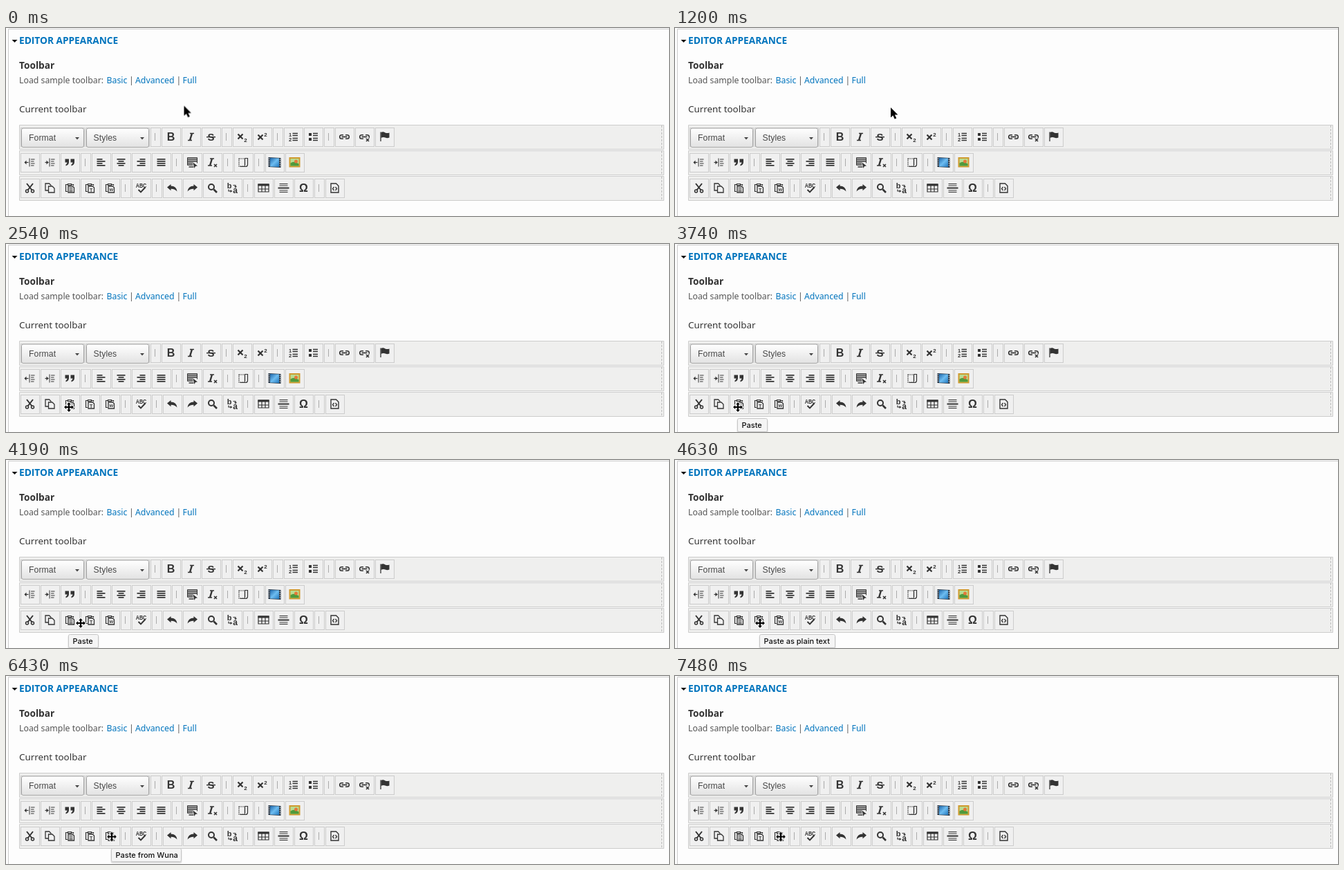
Write an HTML page that moves like this. It is 959 px wide and 272 px high and loops after 8000 ms.

```html
<!DOCTYPE html>
<html lang="en">
<head>
<meta charset="utf-8">
<title>Editor toolbar</title>
<style>
html, body { margin: 0; width: 100%; height: 100%; overflow: hidden; background: #fdfdfd; }
svg { display: block; }
.ui { font-family: "Noto Sans", sans-serif; }
.bold { font: 700 13.7px "Open Sans", sans-serif; }
.combo { font: 12.2px "Liberation Sans", Arial, sans-serif; letter-spacing: .1px; fill: #474747; }
.tip text { font: 500 11px Inter, sans-serif; fill: #111; }
.link { fill: #0074bd; }
.ui .link { font-weight: 500; }
.icon { fill: #333; font-family: "Liberation Sans", Arial, sans-serif; font-weight: 700; text-anchor: middle; }
.line { fill: none; stroke: #333; }
.tip, .cursor { opacity: 0; }
</style>
</head>
<body>
<svg id="stage" width="959" height="272" viewBox="0 0 959 272">
  <defs>
    <linearGradient id="face" x2="0" y2="1"><stop stop-color="#fff"/><stop offset="1" stop-color="#e2e2e2"/></linearGradient>
    <linearGradient id="sky" x2="1" y2="1"><stop stop-color="#1c66ab"/><stop offset=".5" stop-color="#6dbcf0"/><stop offset="1" stop-color="#2279c0"/></linearGradient>
  </defs>
  <path d="M959 1.5H3.5V272" fill="none" stroke="#ccc"/>
  <path d="M8.500 17h8l-4 4z" fill="#111"/>
  <text class="bold link" x="19" y="23">EDITOR APPEARANCE</text>
  <text class="bold" x="19" y="59" fill="#333">Toolbar</text>
  <g class="ui" font-size="12.3" fill="#555">
    <text x="19" y="80">Load sample toolbar:</text>
    <text x="145.5" y="80" class="link">Basic</text>
    <text x="178" y="80">|</text>
    <text x="187" y="80" class="link">Advanced</text>
    <text x="246.5" y="80">|</text>
    <text x="255.5" y="80" class="link">Full</text>
  </g>
  <text class="ui" font-size="13.4" x="19" y="122" fill="#333">Current toolbar</text>
  <g id="toolbar"></g>
  <g id="tips"></g>
  <path id="arrow" class="cursor" d="M0 0V14.5L3.3 11.4 5.8 16.7 8.3 15.6 5.9 10.5H10.4Z" stroke="#fff" stroke-width="1.8" paint-order="stroke" stroke-linejoin="round"/>
  <path id="move" class="cursor" d="M0-7L3-3.8H1.1V-1.1H3.8V-3L7 0 3.8 3V1.1H1.1V3.8H3L0 7-3 3.8H-1.1V1.1H-3.8V3L-7 0-3.8-3V-1.1H-1.1V-3.8H-3Z" stroke="#fff" stroke-width="2" paint-order="stroke" stroke-linejoin="round"/>
</svg>
<script>
const LOOP = 8000;
const $ = id => document.getElementById(id);

// Icon helpers; every icon is drawn around its own centre.
const solid = d => `<path d="${d}"/>`;
const line = (d, width = 1.3) => `<path class="line" stroke-width="${width}" d="${d}"/>`;
const glyph = (s, size, x, y) => `<text font-size="${size}" x="${x}" y="${y}">${s}</text>`;
const bars = (...rows) => solid(rows.map(([x, w], i) => `M${x} ${i * 3 - 5.5}h${w}v1.8h${-w}z`).join(''));
const slantedI = line('M-1.5-5H4.5M-4.5 5H1.5', 1.6) + line('M1.5-5L-1.5 5', 2.4);
const clip = mark => line('M-3.5-5H-6V5H-3.500M2.5-5H5V-3.500', 1.2) +
  line('M-3-4V-6H2V-4Z', 1.2) + line('M-2.5-2.5H4L6-.5V6.5H-2.5Z', 1.3) + mark;
const chain = line('M-1.5-2.8H-4a2.8 2.8 0 0 0 0 5.600H-1.5M1.5-2.8H4a2.8 2.8 0 0 1 0 5.600H1.5', 1.6) + line('M-4 0H4', 1.8);
const indent = side => line('M-.5-6V6', 1) + line('M1.5-4.5H7M1.5-1.500H6M1.5 1.500H7M1.5 4.500H6', 1.2) +
  line('M-7 0H-2', 1.2) + solid(side < 0 ? 'M-8 0l3-3v6z' : 'M-2 0l-3-3v6z');
const quote = x => `M${x}-5h5.500v4.500q0 4-4.500 5.500v-2q2-1 2-3h-3z`;
const turn = 'M-7.500-1L-2-5.500V-3Q6-3 7 5Q4 1-2 1.200V3.800Z';

const ICONS = {
  bold: glyph('B', 16, 0, 5.5),
  italic: slantedI,
  strike: glyph('S', 15, 0, 5.3) + line('M-6.5 .2H6.5', 1.5),
  sub: line('M-6-4L1 3M1-4L-6 3', 2.2) + glyph('2', 8, 5, 7),
  sup: line('M-6-3L1 4M1-3L-6 4', 2.2) + glyph('2', 8, 5, -1),
  numbers: glyph('1', 7.5, -4.5, -1) + glyph('2', 7.5, -4.5, 6.5) + line('M-1-5H6.5M-1-2H6.5M-1 2H6.5M-1 5H6.5', 1.4),
  bullets: solid('M-6.500-5.500h4v4h-4zM-6.500 1.500h4v4h-4z') + line('M-.5-5H6.5M-.5-2H6.5M-.5 2H6.5M-.5 5H6.5', 1.4),
  link: chain,
  unlink: chain + '<path d="M2 2L7 7M7 2L2 7" stroke="#f0f0f0" stroke-width="4"/>' + line('M2.5 2.5L6.5 6.5M6.5 2.5L2.5 6.5', 1.6),
  flag: line('M-5.5-7V6.5', 1.3) + solid('M-5-6.500Q-2-8 1-6Q4-5 7-6V1Q4 2.500 1 1Q-2 0-5 1.500Z'),
  outdent: indent(-1),
  indent: indent(1),
  quote: solid(quote(-7) + quote(1)),
  left: bars([-6, 8], [-6, 12], [-6, 8], [-6, 12]),
  center: bars([-6, 12], [-4, 8], [-6, 12], [-4, 8]),
  right: bars([-2, 8], [-6, 12], [-2, 8], [-6, 12]),
  justify: bars([-6, 12], [-6, 12], [-6, 12], [-6, 12]),
  select: line('M-7-6.500H7M-7-4H7M-7-1.500H7M-7 1H1M-7 3.500H1M-5 6.500H2', 1.4) + line('M-7-7V4M7-7V1', 1) + solid('M1 0L7.500 5 4.500 5.500 3 8.500Z'),
  clear: `<g transform="translate(-2 -.5)">${slantedI}</g>` + line('M2.5 2.5L6.5 6.5M6.5 2.5L2.5 6.5', 1.5),
  blocks: '<path class="line" stroke-dasharray="1.5 1" stroke-width="1.2" d="M-6.5-5.5H2V5.500H-6.5Z"/>' +
    line('M2-6H6V3Q6 6 3 6H-5M2 4V-6', 1.2),
  video: '<path d="M-9-7.500L9-6.500V7.500L-9 6.500Z" fill="#234"/><path d="M-6.5-6.500L6.500-6V6.500L-6.500 6Z" fill="url(#sky)"/>' +
    '<path d="M-7.800-6V6M7.800-5V7" stroke="#ddd" stroke-dasharray="1.5 1.5"/>',
  image: '<path d="M-8-7.500H8V7H-8Z" fill="#cf9a2e"/><path d="M-6-5.500H6V5H-6Z" fill="#b9dc91"/><path d="M-6 5V1Q-1-3 6 2V5Z" fill="#4f9a3c"/><circle cx="2" cy="-1.500" r="2.500" fill="#e5783b"/>',
  cut: line('M-4.5-6.500L3 3M4.5-6.500L-3 3', 2) + line('M-6 4.500a2 2 0 1 0 4 0a2 2 0 1 0-4 0M2 4.500a2 2 0 1 0 4 0a2 2 0 1 0-4 0', 1.5),
  copy: line('M-2.5 3.500H-6.5V-6.500H-1L1.5-4V-3', 1.3) + line('M-2-2.500H3.500L6.5 .5V6.500H-2Z', 1.3),
  paste: clip(line('M-1 0H4M-1 2.200H4M-1 4.400H4', 1.1)),
  plain: clip(glyph('T', 7, 1.7, 5)),
  office: clip(glyph('W', 6, 1.7, 4.8)),
  spell: `<g transform="scale(.85 1)">${glyph('ABC', 8.5, 0, -1)}</g>` + line('M-4 2.500L-.5 6L6-1', 1.9),
  undo: solid(turn),
  redo: `<g transform="scale(-1 1)">${solid(turn)}</g>`,
  find: '<circle class="line" cx="-1.500" cy="-1.500" r="4" stroke-width="2"/>' + line('M2 2L6.500 6.500', 2.6),
  replace: glyph('b', 11, -4.5, 0) + glyph('a', 12, 4, 7) + line('M-5.5 2V4.500H-2M1-4H4.500V-2', 1.2) + solid('M-3 2.500l3 2-3 2zM2.500-2.500h4l-2 2.500z'),
  table: solid('M-8-6H8V-3H-8Z') + line('M-7.500-5.500H7.500V5.500H-7.500ZM-7.500 1.500H7.500M-2.500-5V5M2.500-5V5', 1.2),
  rule: line('M-6-6H6M-6-3.500H6M-6 3.500H6M-6 6H6', 1.2) + line('M-8 0H8', 2),
  omega: glyph('Ω', 16, 0, 5.5),
  source: line('M-5.5-6.500H2L5.5-3V6.500H-5.5Z', 1.4) + line('M-1-1.500L-3 1L-1 3.500M1-1.500L3 1L1 3.500', 1.3)
};

const combos = { format: ['Format', 33], styles: ['Styles', 126.5] };
const rows = [
  'format styles | bold italic strike | sub sup | numbers bullets | link unlink flag',
  'outdent indent quote | left center right justify | select clear | blocks | video image',
  'cut copy paste plain office | spell | undo redo find replace | table rule omega | source'
];

const drawCombo = ([label, textX], x) => `<rect x="${x + 1.5}" y="145" width="90" height="27.5" rx="2.5" fill="url(#face)" stroke="#a6a6a6"/>
  <text class="combo" x="${textX}" y="163">${label}</text>
  <path d="M${x + 79} 158h6l-3 3.500z" fill="#474747"/>`;

function drawRow(tools, row) {
  const y = 140 + row * 37;
  const mid = y + 17.5;
  let x = 21;
  let out = `<path d="M19.5 ${y + .5}h932v35h-932z" fill="#efefee" stroke="#ccc"/>
    <path d="M948.5 ${y + 1}v34" stroke="#bbb" stroke-dasharray="3 2"/>`;
  for (const tool of tools.split(' ')) {
    const width = tool === '|' ? 15 : combos[tool] ? 93 : 28;
    out += `<rect x="${x + .5}" y="${y + 4.5}" width="${width - 1}" height="27" fill="#f0f0f0" stroke="#ccc"/>`;
    if (tool === '|') out += `<path d="M${x + 6.5} ${mid - 5.5}v11" stroke="#aaa"/>`;
    else if (combos[tool]) out += drawCombo(combos[tool], x);
    else out += `<g class="icon" transform="translate(${x + 13.5} ${mid})">${ICONS[tool]}</g>`;
    x += width + 1;
  }
  return out;
}
$('toolbar').innerHTML = rows.map(drawRow).join('');

const tips = [
  { label: 'Paste', x: 90, y: 252, w: 43, from: 3740, to: 4630, fade: 4490 },
  { label: 'Paste as plain text', x: 122, y: 252, w: 109, from: 4630, to: 6430 },
  { label: 'Paste from Wuna', x: 152, y: 249, w: 101, from: 6430, to: 7480 }
];
$('tips').innerHTML = tips.map(({ label, x, y, w }) => `<g class="tip">
  <rect x="${x - .5}" y="${y + 1}" width="${w + 2}" height="21" rx="3" opacity=".12"/>
  <rect x="${x + .5}" y="${y + .5}" width="${w}" height="19" rx="2" fill="#f5f5f5" stroke="#c6c6c6"/>
  <text x="${x + 6.5}" y="${y + 14}">${label}</text></g>`).join('');

// Holds each [time, style] until the next one.
function play(el, steps) {
  const frames = steps.map(([time, style]) => ({ ...style, offset: time / LOOP, easing: 'step-end' }));
  frames.push({ ...steps.at(-1)[1], offset: 1 });
  el.animate(frames, { duration: LOOP, iterations: Infinity });
}

const at = ([time, x, y]) => [time, { transform: `translate(${x}px, ${y}px)`, opacity: 1 }];
const hidden = { opacity: 0, transform: 'translate(0px, 0px)' };
const pointing = [[0, 257.5, 112.5], [1050, 264.5, 112], [1200, 312, 115], [1340, 254.5, 138.5]];
const moving = [
  [1490, 211, 153], [1640, 168, 188], [1940, 133, 207], [2090, 96.5, 224.5], [2240, 92, 228],
  [2390, 92, 235.5], [2540, 91, 236], [4190, 108, 236], [4340, 122.5, 236], [4490, 123, 236],
  [6130, 138, 236], [6280, 152.5, 234], [6430, 153, 232.5]
];
play($('arrow'), [...pointing.map(at), [1490, hidden]]);
play($('move'), [[0, hidden], ...moving.map(at)]);

document.querySelectorAll('.tip').forEach((el, i) => {
  const { from, to, fade } = tips[i];
  play(el, [[0, { opacity: 0 }], [from, { opacity: 1 }], [to, { opacity: 0 }]]);
  if (fade) play(el.querySelector('text'), [[0, { opacity: 1 }], [fade, { opacity: .55 }]]);
});
</script>
</body>
</html>
```
